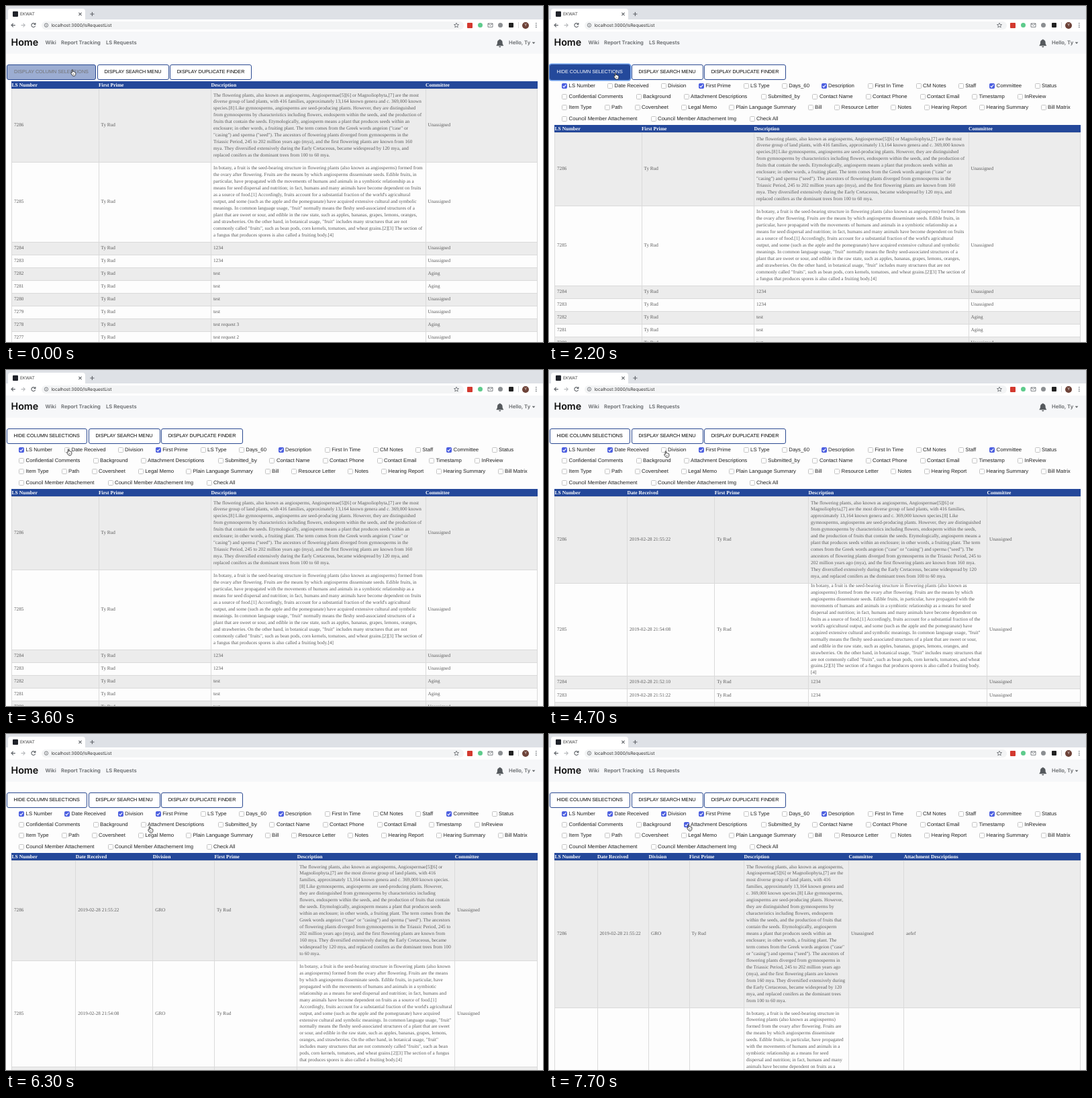
These frames come from a looping animation (800 by 500 pixels, 8000 ms). An HTML page:

```html
<!DOCTYPE html>
<html lang="en">
<head>
<meta charset="utf-8">
<title>Request list</title>
<style>
html, body { margin: 0; width: 100%; height: 100%; overflow: hidden; background: #fdfdfd; }
#stage { position: absolute; left: 0; top: 0; width: 800px; height: 500px; overflow: hidden;
  background: #fdfdfd; text-rendering: geometricPrecision; cursor: default; }
#stage div, #stage svg { position: absolute; box-sizing: border-box; }
.txt { white-space: nowrap; line-height: 12px; height: 12px; }
.ui { font-family: Inter, Roboto, sans-serif; }
.sans { font-family: "Liberation Sans", Arial, sans-serif; }
.serif { font-family: "Liberation Serif", "Times New Roman", serif; }
.btn { top: 87px; height: 23px; border: 1.5px solid #2b4a92; border-radius: 3px; background: #fff;
  font-size: 7.22px; line-height: 20.5px; text-align: center; white-space: nowrap; color: #000; }
.box { width: 8px; height: 8px; border: 1px solid #c4c4c4; border-radius: 1.5px; background: #fff; }
.box.on { background: #4c5fe0; border-color: #4c5fe0; }
.box svg { left: -1px; top: -1px; display: none; }
.box.on svg { display: block; }
.head { left: 8px; width: 784px; top: 0; height: 11.7px; background: #24489a; }
.cell { border-top: 1px solid #dadada; border-left: 1px solid #dadada; padding: 0 3.5px 0 3px;
  display: flex; align-items: center; font-size: 7.22px; line-height: 9.95px; color: #5c5c5c; }
</style>
</head>
<body>
<div id="stage"></div>
<script>
const stage = document.getElementById('stage');
const LOOP = 8000, STEP = 100;

function add(parent, cls, css, text) {
  const el = document.createElement('div');
  el.className = cls;
  for (const k in css) el.style[k] = typeof css[k] === 'number' ? css[k] + 'px' : css[k];
  if (text) el.textContent = text;
  parent.appendChild(el);
  return el;
}
const rect = (left, top, width, height, background, borderRadius = 0) =>
  add(stage, '', { left, top, width, height, background, borderRadius });
const label = (parent, cls, left, mid, text, fontSize, color, fontWeight = '400') =>
  add(parent, 'txt ' + cls, { left, top: mid - 6, fontSize, color, fontWeight }, text);
function svg(parent, w, h, body) {
  const holder = document.createElement('template');
  holder.innerHTML = `<svg width="${w}" height="${h}" viewBox="0 0 ${w} ${h}" fill="none">${body}</svg>`;
  return parent.appendChild(holder.content.firstChild);
}

// Browser window and page header
function drawChrome() {
  rect(0, 0, 800, 20, '#dee1e6');
  rect(3, 4, 115, 17, '#fff', '4px 4px 0 0');
  rect(0, 20, 800, 18, '#fff');
  rect(53, 22.5, 629, 12.5, '#f3f4f5', 6);
  rect(0, 37.5, 800, 33.5, '#f6f7f9');
  rect(9.5, 8, 8, 8, '#20232a', 1);
  label(stage, 'ui', 21, 12, 'EKWAT', 6.3, '#444');
  label(stage, 'ui', 67.5, 28.6, 'localhost:3000/lsRequestList', 6.55, '#333');

  rect(686.5, 24.5, 8, 8, '#d3392f', 1);
  rect(702.5, 24.5, 7.5, 7.5, '#5ecb8c', 4);
  rect(732.5, 25, 7, 7, '#8c8f92', 4);
  rect(748.5, 25, 7, 7, '#222', 1);
  rect(762.5, 24, 1, 9, '#d5d7da');
  rect(769, 23.5, 10, 10, '#6d4238', 5);
  label(stage, 'ui', 772.3, 28.6, 'Y', 5.5, '#fff');

  svg(stage, 800, 75, `
    <g stroke="#5f6368" stroke-width="1.1">
      <path d="M108.4 9.9l4.2 4.2m0-4.2l-4.2 4.2M125.3 12h6.2m-3.1-3.1v6.2"/>
      <path d="M13.8 28.6H8m2.8-2.8L8 28.6l2.8 2.8"/>
      <path d="M22.5 28.6h5.8m-2.8-2.8l2.8 2.8-2.8 2.8" stroke="#b9bbbe"/>
      <path d="M43.2 26.9a2.9 2.9 0 1 0 .4 2.4M43.9 25v2.5h-2.5"/>
      <circle cx="60" cy="28.6" r="2.7" stroke-width=".8"/>
      <path d="M60 28.2v1.9m0-3.2v.6" stroke-width=".8"/>
      <path d="M671 25.2l1 2.3 2.5.2-1.9 1.6.6 2.5-2.2-1.3-2.2 1.3.6-2.5-1.9-1.6 2.5-.2z" stroke-width=".8"/>
      <path d="M718 26h7v5.3h-7zl3.5 2.9L725 26" stroke-width=".8"/>
    </g>
    <g fill="#5f6368"><circle cx="789.8" cy="25.8" r=".8"/><circle cx="789.8" cy="28.6" r=".8"/><circle cx="789.8" cy="31.4" r=".8"/></g>
    <path d="M735.8 49.4c.6 0 .9.4.9.9 1.9.5 2.9 2 2.9 4 0 2.400.5 3.200 1.500 4.300v.7H730.500v-.7c1-1.100 1.500-1.900 1.500-4.300 0-2 1-3.500 2.900-4 0-.5.300-.900.900-.900zM734.300 59.900h3a1.500 1.500 0 0 1-3 0z" fill="#55595d"/>
    <path d="M783.700 53.800h4.700l-2.350 2.600z" fill="#66696c"/>`).style.cssText = 'left:0;top:0';

  label(stage, 'ui', 7.5, 55.2, 'Home', 14.3, '#0c0c0c', '600');
  const nav = [[58.5, 'Wiki'], [82, 'Report Tracking'], [149, 'LS Requests'], [749, 'Hello, Ty']];
  for (const [x, s] of nav) label(stage, 'ui', x, 55, s, 7.65, '#66696c', '600');
}

// Column check boxes
const options = [
  [[19, 'LS Number'], [87, 'Date Received'], [166.5, 'Division'], [222.7, 'First Prime'], [289.5, 'LS Type'],
   [346.7, 'Days_60'], [405.5, 'Description'], [474.7, 'First In Time'], [546.5, 'CM Notes'], [609.7, 'Staff'],
   [656, 'Committee'], [723.5, 'Status']],
  [[19, 'Confidential Comments'], [129.5, 'Background'], [200.5, 'Attachment Descriptions'], [315.7, 'Submitted_by'],
   [392.3, 'Contact Name'], [471.5, 'Contact Phone'], [552.5, 'Contact Email'], [630, 'Timestamp'], [697.7, 'InReview']],
  [[19, 'Item Type'], [82.5, 'Path'], [127.5, 'Coversheet'], [196.7, 'Legal Memo'], [268, 'Plain Language Summary'],
   [385.5, 'Bill'], [425, 'Resource Letter'], [509, 'Notes'], [559, 'Hearing Report'], [641, 'Hearing Summary'],
   [732.5, 'Bill Matrix']],
  [[19, 'Council Member Attachement'], [151.5, 'Council Member Attachement Img'], [298.5, 'Check All']],
];
const checked = ['LS Number', 'First Prime', 'Description', 'Committee'];
const boxes = {};
let panel;

function drawPanel() {
  panel = add(stage, '', { left: 0, top: 0, width: 800, height: 180 });
  options.forEach((row, i) => row.forEach(([x, name]) => {
    const mid = 119 + i * 16.2;
    const box = boxes[name] = add(panel, 'box' + (checked.includes(name) ? ' on' : ''), { left: x, top: mid - 4 });
    svg(box, 8, 8, '<path d="M1.700 4.200l1.600 1.600 3-3.800" stroke="#fff" stroke-width="1.200"/>');
    label(panel, 'sans', x + 10.6, mid, name, 7.78, '#222');
  }));
}

// Request table, once for each set of columns
const plants = 'The flowering plants, also known as angiosperms, Angiospermae[5][6] or Magnoliophyta,[7] are the most diverse group of land plants, with 416 families, approximately 13,164 known genera and c. 369,000 known species.[8] Like gymnosperms, angiosperms are seed-producing plants. However, they are distinguished from gymnosperms by characteristics including flowers, endosperm within the seeds, and the production of fruits that contain the seeds. Etymologically, angiosperm means a plant that produces seeds within an enclosure; in other words, a fruiting plant. The term comes from the Greek words angeion ("case" or "casing") and sperma ("seed"). The ancestors of flowering plants diverged from gymnosperms in the Triassic Period, 245 to 202 million years ago (mya), and the first flowering plants are known from 160 mya. They diversified extensively during the Early Cretaceous, became widespread by 120 mya, and replaced conifers as the dominant trees from 100 to 60 mya.';
const fruit = 'In botany, a fruit is the seed-bearing structure in flowering plants (also known as angiosperms) formed from the ovary after flowering. Fruits are the means by which angiosperms disseminate seeds. Edible fruits, in particular, have propagated with the movements of humans and animals in a symbiotic relationship as a means for seed dispersal and nutrition; in fact, humans and many animals have become dependent on fruits as a source of food.[1] Accordingly, fruits account for a substantial fraction of the world\'s agricultural output, and some (such as the apple and the pomegranate) have acquired extensive cultural and symbolic meanings. In common language usage, "fruit" normally means the fleshy seed-associated structures of a plant that are sweet or sour, and edible in the raw state, such as apples, bananas, grapes, lemons, oranges, and strawberries. On the other hand, in botanical usage, "fruit" includes many structures that are not commonly called "fruits", such as bean pods, corn kernels, tomatoes, and wheat grains.[2][3] The section of a fungus that produces spores is also called a fruiting body.[4]';
const notes = [plants, fruit, '1234', '1234', 'test', 'test', 'test', 'test', 'test request 3', 'test request 2'];
const times = ['55:22', '54:08', '52:10', '51:22', '50:26'];
const aging = [4, 5, 8];
const fields = {
  'LS Number': i => String(7286 - i),
  'Date Received': i => '2019-02-28 21:' + (times[i] || '49:30'),
  'Division': () => 'GRO',
  'First Prime': () => 'Ty Rud',
  'Description': i => notes[i],
  'Committee': i => aging.includes(i) ? 'Aging' : 'Unassigned',
  'Attachment Descriptions': () => 'aefef',
};
const views = [
  { lines: [10, 11], cols: { 'LS Number': 8, 'First Prime': 137.5, 'Description': 305, 'Committee': 624.5 } },
  { lines: [12, 13], cols: { 'LS Number': 8, 'Date Received': 116, 'First Prime': 246.3, 'Description': 386, 'Committee': 652 } },
  { lines: [14, 15], cols: { 'LS Number': 8, 'Date Received': 103.3, 'Division': 218.3, 'First Prime': 310, 'Description': 433.3, 'Committee': 668.3 } },
  { lines: [21, 24], cols: { 'LS Number': 8, 'Date Received': 71.5, 'Division': 148, 'First Prime': 208.5, 'Description': 290, 'Committee': 446, 'Attachment Descriptions': 528 } },
];

function drawTable({ lines, cols }) {
  const table = add(stage, 'serif', { left: 0, top: 0, width: 800, height: 400 });
  const names = Object.keys(cols);
  add(table, 'head', {});
  for (const n of names) label(table, 'serif', cols[n] + .4, 5.9, n, 7.65, '#fff', '700');
  let top = 11.6;
  notes.forEach((_, i) => {
    const height = (lines[i] || 1) * 9.95 + 9.1;
    names.forEach((n, k) => {
      const left = cols[n], right = cols[names[k + 1]] || 792;
      const cell = add(table, 'cell', { left, top, width: right - left, height, background: i % 2 ? '#fdfdfd' : '#ececec' });
      if (right === 792) cell.style.borderRight = '1px solid #dadada';
      const span = document.createElement('span');
      span.textContent = fields[n](i);
      cell.appendChild(span);
    });
    top += height;
  });
  return table;
}

// Tracks: [time, value, ...]
const hoverTrack = [[0, .45], [300, 1], [500, 1], [800, 0], [1800, 0], [2100, 1], [3000, 1], [3300, 0]];
const glowTrack = [[2000, 0], [2200, 1], [3300, 1], [3500, 0]];
const pulseTrack = [[6500, 0], [6600, 1], [6900, 1], [7400, 0]];
const pathTrack = [
  [0, 97.800, 94.300], [100, 99, 95], [400, 114, 95], [600, 124, 86], [800, 126.500, 80.500],
  [1000, 126.500, 80.500], [1100, 101.500, 80.500], [1500, 101.500, 80.500], [1900, 99, 97], [2400, 96.500, 100.800],
  [2800, 96.500, 100.800], [3300, 92.500, 115.500], [3600, 92, 116.700], [4200, 92, 116.700], [4700, 173, 120.200],
  [5100, 173, 120.200], [6000, 213, 136.700], [6300, 213, 136.700], [6500, 206.800, 134], [8000, 206.800, 134]];
const clicks = [['Date Received', 3700], ['Division', 4900], ['Attachment Descriptions', 6600]];
const OPEN = 2100;

function at(track, t, n = 1) {
  if (t <= track[0][0]) return track[0][n];
  for (let i = 1; i < track.length; i++) {
    const a = track[i - 1], b = track[i];
    if (t <= b[0]) return a[n] + (b[n] - a[n]) * (t - a[0]) / (b[0] - a[0]);
  }
  return track[track.length - 1][n];
}
const mix = (a, b, k) => `rgb(${a.map((v, i) => Math.round(v + (b[i] - v) * k))})`;

drawChrome();
drawPanel();
const tables = views.map(drawTable);
const buttons = ['', 'DISPLAY SEARCH MENU', 'DISPLAY DUPLICATE FINDER'].map(s => add(stage, 'btn sans', {}, s));
const hand = svg(stage, 9, 11, '<path d="M2.200 5.600V1.500c0-1.200 1.500-1.200 1.500 0v2.400c.500-.600 1.300-.400 1.500.200.500-.400 1.200-.200 1.300.400.600-.300 1.300 0 1.300.800v2c0 1.600-.900 2.900-2.700 2.900-1.700 0-2.400-.700-3.200-2.200L.700 6.300c-.400-.900.500-1.400 1.500-.700z" fill="#fff" stroke="#111" stroke-width=".8"/><path d="M3.900 6.600v1.800m1.300-1.800v1.800" stroke="#111" stroke-width=".5"/>');
const arrow = svg(stage, 9, 11, '<path d="M.5.500v6.300l1.500-1.300 1 2.300 1.100-.5-1-2.200h2z" fill="#000" stroke="#fff" stroke-width=".5"/>');

function render(t) {
  const open = t >= OPEN;
  const done = clicks.filter(c => t >= c[1]).length;
  panel.style.display = open ? '' : 'none';
  tables.forEach((el, i) => {
    el.style.display = i === done ? '' : 'none';
    el.style.top = (open ? 176.900 : 111.900) + 'px';
  });
  clicks.forEach(([name], i) => boxes[name].classList.toggle('on', i < done));

  const edges = open ? [.5, 122.500, 231] : [1, 135.500, 244];
  const widths = [open ? 120.500 : 133, 107, 122];
  buttons.forEach((b, i) => {
    b.style.left = edges[i] + 'px';
    b.style.width = widths[i] + 'px';
  });
  const h = at(hoverTrack, t), first = buttons[0];
  first.textContent = (open ? 'HIDE' : 'DISPLAY') + ' COLUMN SELECTIONS';
  first.style.background = mix([255, 255, 255], [36, 73, 155], h);
  first.style.color = mix([0, 0, 0], [255, 255, 255], h);
  first.style.boxShadow = `0 0 0 1.500px rgba(105,155,235,${at(glowTrack, t)})`;
  boxes['Attachment Descriptions'].style.filter = `brightness(${1 - .15 * at(pulseTrack, t)})`;

  const x = at(pathTrack, t), y = at(pathTrack, t, 2);
  const overButton = y > 87 && y < 110, overPanel = open && y > 114;
  const isHand = overButton || overPanel;
  hand.style.display = isHand ? '' : 'none';
  arrow.style.display = isHand ? 'none' : '';
  const pointer = isHand ? hand : arrow;
  pointer.style.left = x - (isHand ? 2 : 0) + 'px';
  pointer.style.top = y + 'px';
}

const start = performance.now();
function tick() {
  const t = (performance.now() - start) % LOOP;
  render(Math.floor(t / STEP) * STEP);
  requestAnimationFrame(tick);
}
tick();
</script>
</body>
</html>
```
